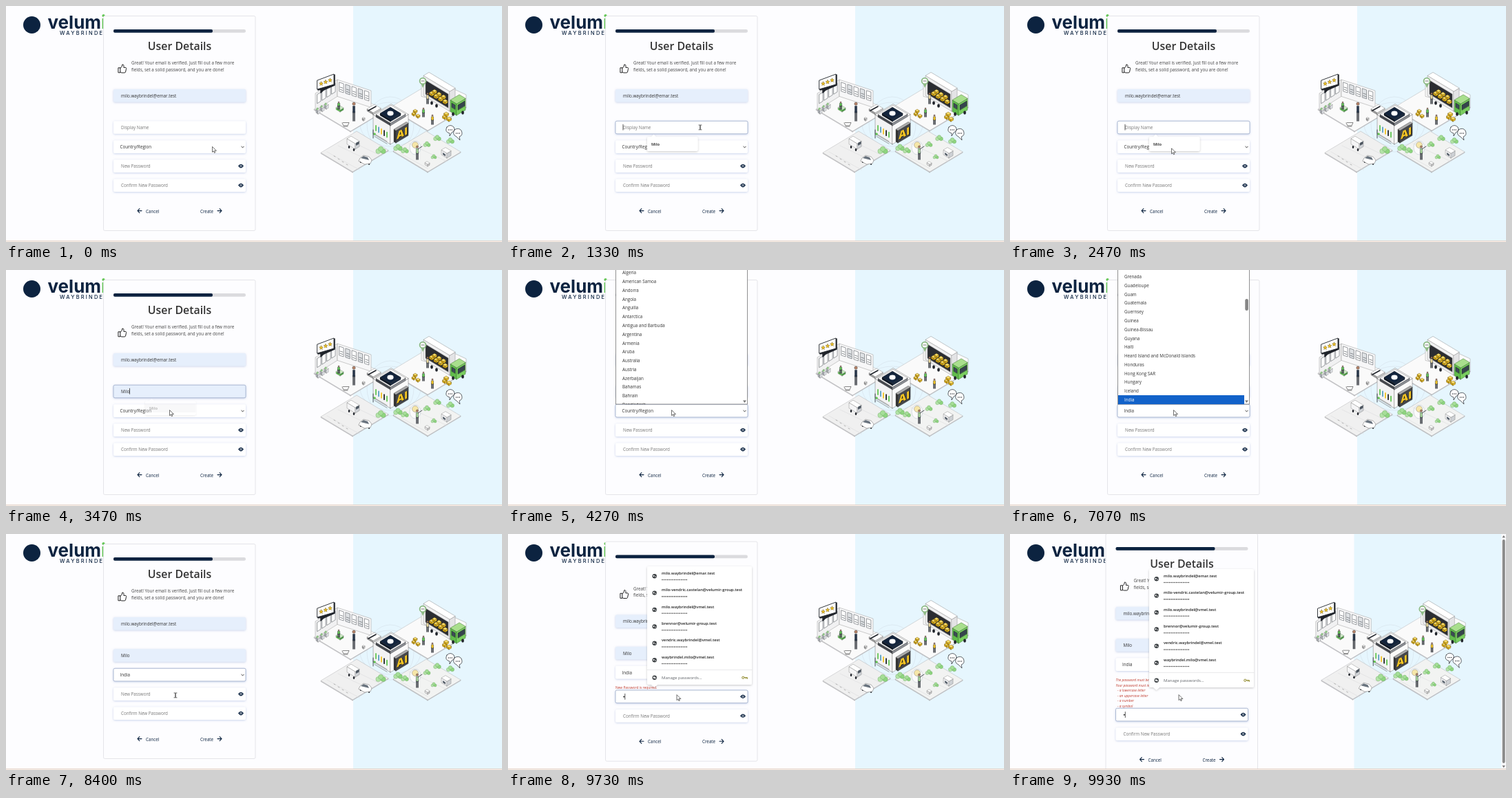
Write an HTML page that moves like this. It is 720 px wide and 343 px high and loops after 10 s.

```html
<!DOCTYPE html>
<html lang="en">
<head>
<meta charset="utf-8">
<title>User Details</title>
<style>
html, body { margin: 0; width: 100%; height: 100%; overflow: hidden; background: #fdfdff; }
svg { display: block; width: 720px; height: 343px; font-family: 'Open Sans', 'Noto Sans', sans-serif; }
</style>
</head>
<body>
<svg id="stage" viewBox="0 0 720 343" xmlns="http://www.w3.org/2000/svg">
  <defs>
    <filter id="soft" x="-10%" y="-40%" width="120%" height="200%">
      <feDropShadow dx="0" dy=".8" stdDeviation="1.4" flood-color="#8fa3d4" flood-opacity=".5"/>
    </filter>
    <filter id="lift" x="-10%" y="-20%" width="120%" height="150%">
      <feDropShadow dx="0" dy="1" stdDeviation="1.5" flood-color="#000" flood-opacity=".22"/>
    </filter>
    <clipPath id="listClip"><rect x="157" y="0" width="190" height="195"/></clipPath>
  </defs>
  <rect width="720" height="343" fill="#fdfdff"/>
  <rect id="panel" y="0" height="341" fill="#e6f6fe"/>
  <g id="art"></g>
  <g id="ui"></g>
</svg>
<script>
const NAVY = '#0c2340', INK = '#333', GREEN = '#62c653', YELLOW = '#f2c424', DARK = '#20242b', PALE = '#f7f7f8';
const LOOP = 10000, ROW = 12.78;
const $ = id => document.getElementById(id);

const path = (d, fill = 'none', stroke = 'none', w = .5) =>
  `<path d="${d}" fill="${fill}" stroke="${stroke}" stroke-width="${w}" stroke-linecap="round" stroke-linejoin="round"/>`;
const rect = (x, y, w, h, fill, r = 0, more = '') =>
  `<rect x="${x}" y="${y}" width="${w}" height="${h}" rx="${r}" fill="${fill}" ${more}/>`;
const dot = (x, y, r, fill, more = '') => `<circle cx="${x}" cy="${y}" r="${r}" fill="${fill}" ${more}/>`;
const oval = (x, y, rx, ry, fill, more = '') => `<ellipse cx="${x}" cy="${y}" rx="${rx}" ry="${ry}" fill="${fill}" ${more}/>`;
const text = (x, y, s, size = 6.25, fill = INK, more = '') =>
  `<text x="${x}" y="${y}" font-size="${size}" fill="${fill}" ${more}>${s}</text>`;
const group = (body, more) => `<g ${more}>${body}</g>`;
const fade = (t, a, b) => Math.max(0, Math.min(1, (t - a) / (b - a)));
const range = n => [...Array(n).keys()];

// Isometric block, (x, y) is its lowest corner
function block(x, y, a, b, h, top, left, right, line = '#777') {
  const k = .6, p = (d, f) => path(d, f, line, .4);
  return p(`M${x} ${y}l${-a} ${-a * k}v${-h}l${a} ${a * k}z`, left) +
    p(`M${x} ${y}l${b} ${-b * k}v${-h}l${-b} ${b * k}z`, right) +
    p(`M${x} ${y - h}l${-a} ${-a * k}l${b} ${-b * k}l${a} ${a * k}z`, top);
}
const tile = (x, y, a, b, top = '#fafafa') => block(x, y, a, b, 1.2, top, '#cfcfd2', '#dadadd', '#a4a4a8');
const carton = (x, y, s = 3) => block(x, y, s, s, s * .8, '#ffdf66', '#d9a90f', YELLOW, '#5d4a10');
const tree = (x, y, s) => ['#b4e3a8', '#8fd67f', '#a5de97'].map((c, i) =>
  dot(x + [-s, s, 0][i], y + [1, 1, -s * .6][i], s, c, 'stroke="#5d9e56" stroke-width=".35"')).join('');
const person = (x, y, h, top) => path(`M${x - 1} ${y}v${-h * .5}M${x + 1} ${y}v${-h * .5}`, 'none', DARK, 1.3) +
  path(`M${x - 1.6} ${y - h * .45}v${-h * .35}h3.2v${h * .35}z`, top, DARK, .4) +
  dot(x, y - h * .92, h * .08, '#b98468', 'stroke="#222" stroke-width=".4"');
const star = (x, y, r) => path('M' + range(10).map(i => {
  const q = i % 2 ? r * .45 : r, a = i * Math.PI / 5 - Math.PI / 2;
  return `${(x + q * Math.cos(a)).toFixed(2)} ${(y + q * Math.sin(a)).toFixed(2)}`;
}).join('L') + 'z', YELLOW, '#5d4a10', .4);

function drawArt() {
  let s = '';
  // faint links
  s += group(oval(558, 172, 44, 32, 'none') + oval(558, 172, 34, 40, 'none') +
    path('M530 135Q556 122 582 140M532 208Q556 224 584 208'), 'stroke="#ccd5dd" stroke-width=".4"');

  // shop
  s += tile(500, 183, 53, 49);
  s += path('M449 151V127L481 107V131z', '#f1f1f2', '#999') + path('M481 131V107L530 123V147z', PALE, '#999');
  for (const i of range(4)) s += path(`M${452 + i * 7} ${128.5 - i * 4.5}l5 -3.2v13l-5 3.2z`, '#fff', '#5c6066', .6);
  for (const i of range(5)) s += path(`M${484 + i * 9.2} ${111 + i * 3}l6 2v13l-6 -2z`, i % 2 ? '#dfe2e5' : '#fff', '#5c6066', .6) +
    path(`M${485 + i * 9.2} ${118 + i * 3}l4 1.3m-4 2l4 1.3`, 'none', '#6c7177', .8);
  for (const i of range(3)) s += block(453 + i * 6, 157 - i * 3.5, 3, 3, 5, '#fff', '#a9adb3', '#dfe2e6') + tree(452 + i * 6, 149 - i * 3.5, .8);
  s += block(485, 154, 6, 5, 3, '#cdeec4', GREEN, '#4aa043') + person(483, 150, 11, GREEN);
  s += person(505, 167, 27, '#27364b') + path('M488 170l2 4h6l2 -4.5h-9m1 5.5h6', 'none', '#555', .7);
  s += block(533, 158, 9, 11, 3, '#fff', '#999', '#ccc') + path('M526 152l11 -6', 'none', DARK, 1.6);
  s += block(519, 167, 2, 2, 3, '#eee', '#999', '#ccc');

  // rating bubble
  s += path('M453 109L477 100V115L461 122L457 126V121L453 122z', DARK, DARK, 1.5) +
    path('M452 108L476 99V114L452 121z', '#fff', DARK, .9);
  for (const i of range(3)) s += star(457.5 + i * 6.5, 113 - i * 2.5, 3.1);

  // depot
  s += tile(612, 182, 55, 56);
  s += path('M603 131V107L612 103L668 129V147z', '#fbfbfb', '#999');
  s += block(644, 153, 38, 8, 29, '#fff', '#f0f0f1', '#e4e4e6');
  s += path('M609 128V108L642 128V148z', '#2b2d32', '#777');
  for (const i of range(4)) s += carton(618 + i * 6.5, 131 + i * 3.9, 3.6) + (i < 3 ? carton(622 + i * 6.5, 128 + i * 3.9, 3.4) : '');
  s += block(654, 159, 9, 13, 17, '#a9df8d', '#62bd4c', '#7ace60', '#2c5c25');
  s += path('M656 151v-7l10 -6v7z', '#36444d', DARK) + path('M647 147v-6l5 3v6z', '#3c4b55', DARK);
  for (const [x, y] of [[618, 141], [625, 145], [649, 157], [663, 155]]) s += oval(x, y, 1.9, 2.7, DARK);
  s += carton(592, 160) + carton(598, 163) + carton(594, 156) + carton(637, 165, 3.5) + carton(643, 168, 3.5) + carton(639, 161, 3.5);
  s += person(612, 142, 16, '#e9d9a0') + person(606, 161, 13, GREEN) + person(619, 172, 14, YELLOW);
  s += dot(605, 109, 4.4, '#fff', 'stroke="#8cba84" stroke-width="1.8"') + path('M603 114l2 5 2.5 -5', '#8cba84') + path('M603 109h4', 'none', '#555', .8);

  // road
  s += tile(503, 242, 46, 52, '#f0f0f0');
  s += path('M466 212L513 238M482 203L530 226M495 194L545 218', 'none', '#dcdcde', .6);
  s += block(507, 208, 12, 6, 8, '#fff', '#f5f5f6', '#cfd2d6') + path('M508 203v-4l4.5 -2.6v4z', '#4c555f');
  for (const [x, y] of [[498, 205], [505, 209], [515, 226], [527, 229]]) s += oval(x, y, 1.3, 1.9, DARK);
  s += path('M512 225l2 -4 5 -4 8 2 4 5 -2 5 -8 1z', '#fff', '#666') + path('M515 221l4 -3 6 2 2 4z', '#69737e');
  for (const i of range(4)) s += path(`M${476 + i * 6} ${218 + i * 4}l2 1`, 'none', '#999', .7);
  s += tree(544, 210, 3.6);

  // neighbourhood
  s += tile(612, 242, 50, 48, '#f2f3f2');
  s += path('M572 214L612 236M585 200L640 226', 'none', '#dcdcde', .6);
  s += tree(569, 206, 3.2) + tree(579, 210, 2.7) + tree(611, 201, 2.5) + tree(626, 192, 2.7) + tree(645, 196, 2.8) + tree(621, 219, 2);
  s += oval(594, 206, 8, 10, '#fff', 'stroke="#9ab" stroke-width=".5" opacity=".7"') + oval(594, 202, 4.5, 4.5, '#f6e6a8', 'stroke="#888" stroke-width=".5"');
  s += person(597, 223, 20, '#a9d79c') + path('M598 208l6 -4', 'none', DARK, .8);
  s += block(640, 221, 8, 6, 7, '#fff', '#f0f0f2', '#cdd0d4') + path('M634 213l4 2.4v3l-4 -2.4z', '#59636d');
  s += block(612, 233, 4, 3, 3, '#fff', '#e4e4e4', '#c8c8c8');
  s += path('M640 176q5 -5 10 0q3 5 -3 8l-3 5v-4q-8 -2 -4 -9z', '#fff', DARK, .7) +
    path('M651 180q6 -4 10 1q3 7 -3 9l1 5 -5 -5q-7 -3 -3 -10z', '#fff', DARK, .7);
  for (const i of range(3)) s += dot(642.5 + i * 2.4, 180, .7, DARK) + dot(653.5 + i * 2.4, 185, .7, DARK);

  // hub
  s += block(558, 201, 25, 26, 28, '#fff', '#f3f3f4', '#fafafa', '#555');
  s += block(558, 174, 21, 22, 4, '#fff', '#45484e', '#8b8e94', '#444');
  s += block(558, 168, 15, 15, 3, '#13243c', '#0b1626', '#1a2c45', '#111') + oval(558, 156, 4.6, 3.4, '#fff');
  for (const [i, c] of [GREEN, '#5aa0c4', YELLOW, DARK, GREEN].entries())
    s += path(`M${537 + i * 4} ${174 + i * 2.4}v7`, 'none', c, 1.8);
  s += path('M535 186l18 10.8M535 189.5l18 10.8', 'none', '#777', .7);
  s += block(566, 199, 3, 18, 18, '#aaa', '#333', '#45474b', '#333');
  s += group(text(.8, .6, 'AI', 15, '#111', 'font-weight="800"') + text(0, 0, 'AI', 15, YELLOW, 'font-weight="800"'),
    'transform="matrix(1 -.5 0 1 567 194)"');
  s += dot(535, 186, 1.8, GREEN) + path('M533 180v12', 'none', DARK, .8);
  $('art').innerHTML = s;
}

const NAMES = ['Algeria', 'American Samoa', 'Andorra', 'Angola', 'Anguilla', 'Antarctica', 'Antigua and Barbuda',
  'Argentina', 'Armenia', 'Aruba', 'Australia', 'Austria', 'Azerbaijan', 'Bahamas', 'Bahrain', 'Bangladesh'];
const LATER = ['Greenland', 'Grenada', 'Guadeloupe', 'Guam', 'Guatemala', 'Guernsey', 'Guinea', 'Guinea-Bissau', 'Guyana',
  'Haiti', 'Heard Island and McDonald Islands', 'Honduras', 'Hong Kong SAR', 'Hungary', 'Iceland', 'India'];
const USER = 'Milo', MAIL = 'milo.waybrindel@emar.test';
const LOGINS = [MAIL, 'milo-vendric.castelan@velumir-group.test', 'milo.waybrindel@vmel.test',
  'brennor@velumir-group.test', 'vendric.waybrindel@vmel.test', 'waybrindel.milo@vmel.test'];
const RULES = ['The password must be at least 8 characters.', 'Your password must include:', '&#160;&#160;- a lowercase letter',
  '&#160;&#160;- an uppercase letter', '&#160;&#160;- a number', '&#160;&#160;- a symbol'];

function field(y, label, o = {}) {
  const fill = o.filled ? '#e6effc' : '#fff';
  const edge = o.focus ? 'stroke="#9eacc9" stroke-width=".8"' : '';
  return rect(156, y, 192, 18.6, fill, 2, `filter="url(#soft)" ${edge}`) +
    text(o.x || 167, y + 11.9, label, 6.25, o.hint ? '#777' : INK);
}
const eye = y => path(`M337 ${y}q4 -5.6 8 0q-4 5.6 -8 0z`, NAVY) + dot(341, y, 1.5, '#fff') + dot(341, y, .9, NAVY);
const caret = (x, y) => path(`M${x} ${y - 4}v8`, 'none', '#111', .7);
const arrow = (x, y, dir) => path(`M${x} ${y}h${6 * dir}m${-2.8 * dir} -3l${2.8 * dir} 3l${-2.8 * dir} 3`, 'none', NAVY, 1.1);
const globe = (x, y) => dot(x, y, 3.2, '#3c4043') + path(`M${x - 2} ${y - 1.4}l2 .4 -.4 1.6 -1.4 .4zM${x + .6} ${y + .6}l1.6 -.8 -.6 2.2z`, '#fff');

function dropdown(t) {
  const early = t < 5270, pick = t < 5500 ? 'Iceland' : 'India';
  const list = early ? NAMES : LATER, hit = list.indexOf(pick);
  let s = rect(156.5, -5, 191, 200, '#fff', 0, 'stroke="#777" stroke-width=".8"'), rows = '';
  if (!early) rows += rect(157, 182, 183, 13, '#1262c9');
  list.forEach((n, i) => {
    const y = early ? 6.3 + i * ROW : 191 - (hit - i) * ROW;
    rows += text(166, y, n, 6.25, i === hit ? '#fff' : INK);
  });
  s += group(rows, 'clip-path="url(#listClip)"');
  if (!early) s += rect(341.3, 42, 4.6, 17, '#858585', 2.3);
  return s + path('M341 189.5h5l-2.5 3.5z', '#777');
}

function namePopup(hover) {
  return group(rect(202, 190, 73.5, 21, '#fff', 2.5) + path('M208 190.3l3.5 -3.5 3.5 3.5z', '#fff'), 'filter="url(#lift)"') +
    (hover ? rect(202, 194, 73.5, 13, '#ececef') : '') +
    text(208, 202.6, USER, 5.8, '#222', 'font-weight="600"');
}

function loginPopup() {
  let s = group(rect(202, 47, 152, 172, '#fff', 2.5) + path('M208 218.8l4.5 4 4.5 -4z', '#fff'), 'filter="url(#lift)"');
  LOGINS.forEach((m, i) => {
    const y = 58.7 + i * 24.4;
    s += globe(212.7, y + 2.5) + text(223, y, m, 5.8, '#222', 'font-weight="600"');
    for (const k of range(15)) s += dot(224 + k * 2.52, y + 7.8, .8, '#333');
  });
  return s + path('M202 197.5h152', 'none', '#dcdce0', .6) + globe(212.7, 208.7) + dot(212.7, 208.7, 1.2, '#fff') +
    text(223, 210.9, 'Manage passwords...', 6, '#5f6368') +
    dot(341.3, 208.7, 1.6, 'none', 'stroke="#8a8420" stroke-width="1"') + path('M343 208.7h4.5v1.6m-2 -1.6v1.4', 'none', '#8a8420', 1);
}

const MOVES = [[0, 299.5, 204.8], [130, 299.5, 204.8], [530, 278, 176], [2000, 278, 176], [2330, 234.5, 207.2],
  [2470, 234.5, 207.2], [2730, 237.5, 204], [7930, 237.5, 204], [8400, 245, 234], [LOOP, 245, 234]];
function pointer(t) {
  const i = Math.max(1, MOVES.findIndex(m => m[0] > t)), [a, x0, y0] = MOVES[i - 1], [b, x1, y1] = MOVES[i];
  let k = fade(t, a, b);
  k = k * k * (3 - 2 * k);
  const x = x0 + (x1 - x0) * k, y = y0 + (y1 - y0) * k;
  const typing = (t < 2330 && y < 186) || (t < 8800 && y > 223);
  return group(typing
    ? path('M-1 -3h1.6q.4 0 .4 .6v5.6q0 .6 -.4 .6h-1.6M3 -3h-1.6q-.4 0 -.4 .6v5.6q0 .6 .4 .6h1.6', 'none', '#222', .7)
    : path('M0 0V7.6L1.8 6 3 8.7 4.3 8.1 3.1 5.5H5.5z', '#fff', '#333', .7), `transform="translate(${x.toFixed(2)} ${y.toFixed(2)})"`);
}

function scene(t) {
  const step = t >= 9800 ? 2 : t >= 9330 ? 1 : 0;
  const dx = [0, 0, -2.5][step], up = [0, -3.5, -15][step], down = [0, 3.7, 30][step];
  const listOn = fade(t, 4040, 4260) * (1 - fade(t, 7070, 7330));
  const nameOn = fade(t, 1240, 1330) * (1 - fade(t, 3270, 3580));
  const loginOn = fade(t, 8700, 8990);
  const filled = t >= 2600, onName = t >= 1270 && t < 4070, onPass = t >= 8730;

  // brand
  let s = dot(37.5, 27.5, 12.5, NAVY);
  const brand = 'Inter, sans-serif';
  s += text(60.5, 33.4, `velum<tspan fill="${GREEN}">ir</tspan>`, 26, NAVY, `font-family="${brand}" font-weight="700"`);
  s += text(78, 42, 'WAYBRINDEL', 7.5, NAVY, `font-family="${brand}" font-weight="500" letter-spacing="2.2"`);

  // card
  s += rect(141.5 + dx, 14.5 + up, 220.5, 312 + down - up, '#fdfdff', 2, 'stroke="#e2e2e7" stroke-width=".9"');

  let top = rect(156, 34, 192, 4.8, '#dbdbde', 2.4) + rect(156, 34, 144, 4.8, NAVY, 2);
  top += text(252, 64, 'User Details', 15.9, INK, 'text-anchor="middle" font-weight="600"');
  top += path('M163.3 89.8h2.6v7h-2.6zM165.9 90.4q3 -1.6 3 -5.4q2.6 -.4 2 4.4h3q1.2 .6 .6 2l-1 4.6q-.4 1 -1.6 1h-4q-1 0 -2 -1', 'none', '#222', 1);
  top += text(182, 85.3, 'Great! Your email is verified. Just fill out a few more', 6.3, '#444') +
    text(182, 94.5, 'fields, set a solid password, and you are done!', 6.3, '#444');
  top += field(121, MAIL, { filled: true });
  top += field(167.2, filled ? USER : 'Display Name', { filled, hint: !filled, focus: onName });
  const country = t < 5270 ? 'Country/Region' : t < 5500 ? 'Iceland' : 'India';
  top += field(195.3, country, { x: 165.5, focus: t >= 4070 && t < 8730 });
  top += path('M341.8 204.2l1.7 1.7 1.7 -1.7', 'none', '#222', .9);
  if (t >= 1270 && t < 3270 && Math.floor((t - 1270) / 533) % 2 === 0) top += caret(167, 176.2);
  if (t >= 3270 && t < 3800) top += caret(179.5, 176.2);
  s += group(top, `transform="translate(${dx} ${up})"`);

  if (step === 1) s += text(156, 225.4, 'New Password is required.', 4.9, '#c0392b', 'font-weight="500"');
  if (step === 2) RULES.forEach((r, i) => { s += text(153.5, 214 + i * 7.6, r, 4.9, '#c0392b', 'font-weight="500" font-style="italic"'); });

  let low = field(223.3, step ? '' : 'New Password', { hint: true, focus: onPass }) + eye(232.6);
  if (step) low += dot(168.3, 232.8, 1, '#222');
  if (onPass) low += caret(step ? 169.8 : 167, 232.6);
  low += field(251.4, 'Confirm New Password', { hint: true }) + eye(260.6);
  low += arrow(197, 297.6, -1) + text(203, 300.8, 'Cancel', 6.25, NAVY) + text(282, 300.8, 'Create', 6.25, NAVY) + arrow(307, 297.6, 1);
  s += group(low, `transform="translate(${dx} ${down})"`);

  // overlays
  if (t >= 1130 && t < 1270) s += rect(280.5, 182.8, 55.5, 11.6, '#fff', 1, 'stroke="#bbb" stroke-width=".6"') +
    text(282.8, 190.4, 'Please fill out this field.', 4.5, '#444');
  if (nameOn) s += group(namePopup(filled), `opacity="${nameOn.toFixed(2)}"`);
  if (listOn) s += group(dropdown(t), `opacity="${listOn.toFixed(2)}"`);
  if (loginOn) s += group(loginPopup(), `opacity="${loginOn.toFixed(2)}" transform="translate(0 ${step === 2 ? 4 : 0})"`);

  if (step === 2) s += rect(713.5, 0, 6.5, 341, '#f8f8fa') + rect(714.7, 8, 4, 325, '#8a8a8a', 2) +
    path('M714.5 5.2h4.4l-2.2 -3.2zM714.5 336.5h4.4l-2.2 3.2z', '#777');
  s += rect(0, 341, 720, 1.2, '#e3cfc2') + rect(0, 342.2, 720, .8, '#fbf6f3');
  return s + pointer(t);
}

let last = '';
function render(t) {
  const s = scene(t);
  if (s === last) return;
  last = s;
  const narrow = t >= 9800;
  $('panel').setAttribute('x', narrow ? 499.5 : 504);
  $('panel').setAttribute('width', narrow ? 214 : 216);
  $('art').setAttribute('transform', narrow ? 'matrix(.992 0 0 .992 -1.5 1)' : '');
  $('ui').innerHTML = s;
}

drawArt();
const start = performance.now();
function tick() {
  render((performance.now() - start) % LOOP);
  requestAnimationFrame(tick);
}
tick();
</script>
</body>
</html>
```
